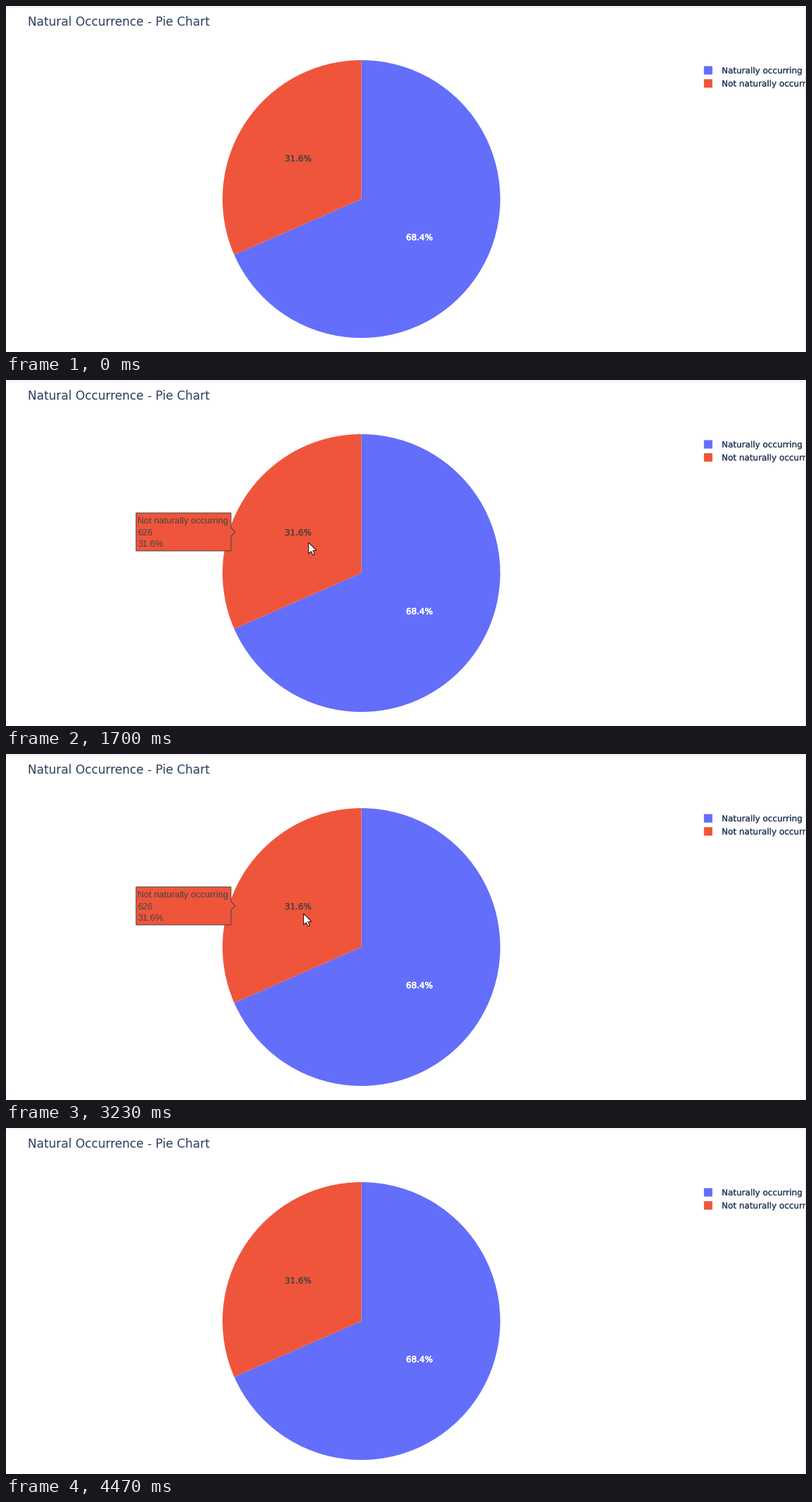
Animation, 1138 px wide and 492 px high, one loop 5.07 s. Source, as a matplotlib script:

```python
import matplotlib.pyplot as plt
from matplotlib.animation import FuncAnimation
from matplotlib.patches import Polygon, Rectangle, Wedge
from matplotlib.patheffects import withStroke

W, H, DPI = 1138, 492, 100
LOOP, STEP = 5070, 10
PT = 72 / DPI
BLUE, RED, NAVY, DARK = "#636efa", "#ef553b", "#2a3f5f", "#444444"
COUNTS = {"Naturally occurring": 1356, "Not naturally occurring": 626}
YES, NO = COUNTS
TOTAL = sum(COUNTS.values())

fig = plt.figure(figsize=(W / DPI, H / DPI), dpi=DPI, facecolor="white")
ax = fig.add_axes([0, 0, 1, 1])
ax.set(xlim=(0, W), ylim=(H, 0))
ax.axis("off")


def text(x, y, s, size, color, font="DejaVu Sans", heavy=0, **kw):
    label = ax.text(x, y, s, fontsize=size * PT, color=color, family=font,
                    va="baseline", **kw)
    if heavy:
        label.set_path_effects([withStroke(linewidth=heavy * PT,
                                           foreground=color)])
    return label


def share(name):
    return f"{100 * COUNTS[name] / TOTAL:.1f}%"


def pie():
    cx, cy, r = 505.5, 274.5, 197.5
    split = -90 + 360 * COUNTS[YES] / TOTAL
    ax.add_patch(Wedge((cx, cy), r, -90, split, fc=BLUE, lw=0))
    ax.add_patch(Wedge((cx, cy), r, split, 270, fc=RED, lw=0))
    text(415.5, 221, share(NO), 12, DARK, heavy=0.3, ha="center")
    text(588, 333, share(YES), 12, "white", heavy=0.6, ha="center")


def legend():
    for i, (name, color) in enumerate(zip(COUNTS, (BLUE, RED))):
        y = 91.5 + 18.6 * i
        ax.add_patch(Rectangle((992.8, y - 6), 12, 12, fc=color, lw=0,
                               snap=False))
        text(1018, y + 4.3, name, 12, NAVY, heavy=0.2)


def tooltip(name, left, right, top, tip, fill, ink):
    """Hover box with an arrow at x = tip; returns its artists."""
    bottom, mid = top + 54, top + 27
    near, far = (right, left) if tip > right else (left, right)
    pts = [(near, top), (near, mid - 6), (tip, mid), (near, mid + 6),
           (near, bottom), (far, bottom), (far, top)]
    box = Polygon(pts, fc=fill, ec=ink, lw=PT, zorder=4)
    ax.add_patch(box)
    rows = (name, COUNTS[name], share(name))
    return [box] + [text(left + 2.5, top + 15.2 + 16.6 * i, str(row), 12.85,
                         ink, "Liberation Sans", zorder=5)
                    for i, row in enumerate(rows)]


text(31, 28, "Natural Occurrence - Pie Chart", 17, NAVY)
pie()
legend()
ax.plot([0, W - 0.5, W - 0.5], [0.5, 0.5, H], color="#e6e6e6", lw=PT, zorder=3)

tips = {
    YES: tooltip(YES, 692.5, 806, 301.5, 686.5, BLUE, "white"),
    NO: tooltip(NO, 185, 320, 189, 326, RED, DARK),
}
ARROW = [(0, 0), (0, 16), (3.7, 12.6), (6.2, 18), (8.7, 17), (6.3, 11.6),
         (11.2, 11.3)]
cursor = Polygon(ARROW, fc="white", ec="black", lw=PT * 0.9, zorder=9)
ax.add_patch(cursor)


def ease_in(u):
    return u ** 1.7


def ease_out(u):
    return 1 - (1 - u) ** 1.5


def ease(u):
    return u * u * (3 - 2 * u)


# time, x, y, easing used to arrive there
PATH = [
    (170, 1055, 484, ease),
    (310, 769, 375, ease_out),
    (460, 984, 467, ease),
    (1220, 984, 467, ease),
    (1490, 790, 321, ease_in),
    (1700, 430, 231, ease_out),
    (1720, 429, 229, ease),
    (1750, 429, 229, ease),
    (2270, 542, 288, ease),
    (2290, 543, 289, ease),
    (2450, 543, 289, ease),
    (2560, 538, 284, ease),
    (2680, 546, 287, ease),
    (2800, 543, 289, ease),
    (2820, 540, 287, ease),
    (2920, 423, 228, ease),
    (3060, 412, 223, ease_out),
    (3330, 428, 229, ease),
    (3350, 428, 229, ease),
    (3660, 523, 276, ease_in),
    (3830, 543, 291, ease_out),
    (3930, 543, 291, ease),
    (4070, 915, 437, ease),
    (4340, 915, 437, ease),
    (4470, 1060, 498, ease_in),
]
HOVER = [(0, None), (1590, YES), (1660, NO), (2110, YES), (2960, NO),
         (3700, YES), (4040, None)]


def cursor_at(t):
    for (t0, x0, y0, _), (t1, x1, y1, curve) in zip(PATH, PATH[1:]):
        if t0 <= t < t1:
            u = curve((t - t0) / (t1 - t0))
            return round(x0 + (x1 - x0) * u), round(y0 + (y1 - y0) * u)
    return None


def draw(frame):
    t = frame * STEP
    pos = cursor_at(t)
    cursor.set_visible(pos is not None)
    if pos:
        cursor.set_xy([(pos[0] + 0.3 + x, pos[1] + y) for x, y in ARROW])
    hovered = [name for start, name in HOVER if start <= t][-1]
    for name, artists in tips.items():
        for artist in artists:
            artist.set_visible(name == hovered)
    return [cursor, *tips[YES], *tips[NO]]


anim = FuncAnimation(fig, draw, frames=LOOP // STEP, interval=STEP,
                     repeat=True, repeat_delay=0, blit=False)
plt.show()
```
